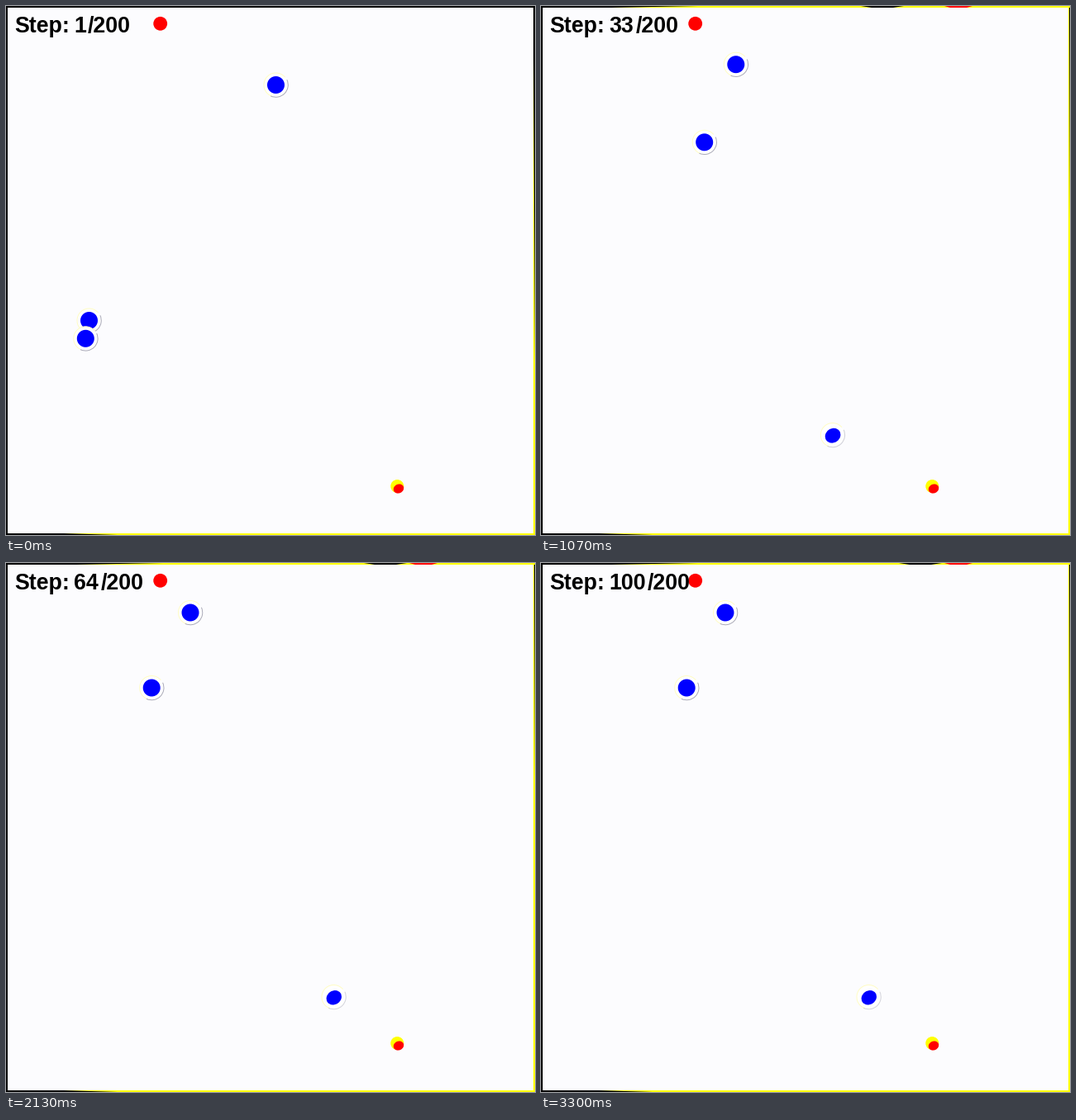
Recreate the animation shown at these times as a matplotlib script. Size 640 by 640 pixels, loop 3330 ms.

```python
import numpy as np
import matplotlib.pyplot as plt
from matplotlib.animation import FuncAnimation
from matplotlib.patches import Arc, Circle, Ellipse, Polygon, Rectangle

SIZE, DPI = 640, 100
STEPS, LOOP_MS = 100, 3330
BLUE, RED, YELLOW = "#0000ff", "#ff0000", "#ffff00"
KEYS = np.array([1, 21, 33, 43])

# Positions of each agent at the key steps; they rest after the last one.
PATHS = [
    [(326.5, 95.5), (198.5, 88.8), (235.8, 70.7), (223, 60)],
    [(100.5, 380.5), (159, 220.3), (197.7, 164.8), (176.2, 151)],
    [(96.3, 402.3), (256.5, 489.8), (352.8, 519), (396.5, 525)],
]
BUMP_PATH = [190, 335, 413, 459]

fig = plt.figure(figsize=(SIZE / DPI, SIZE / DPI), dpi=DPI)
ax = fig.add_axes([0, 0, 1, 1])
ax.set_xlim(0, SIZE)
ax.set_ylim(SIZE, 0)
ax.axis("off")
fig.patch.set_facecolor("#fcfcfe")


def track(values, step):
    """Monotone cubic through the key values, ending at rest."""
    values = np.asarray(values, float)
    h = np.diff(KEYS)
    slope = np.diff(values) / h
    tangent = np.zeros(len(values))
    tangent[0] = slope[0]
    for i in range(1, len(h)):
        a, b = slope[i - 1], slope[i]
        if a * b > 0:
            tangent[i] = 2 * a * b / (a + b)
    step = min(step, KEYS[-1])
    i = min(np.searchsorted(KEYS, step, side="right") - 1, len(h) - 1)
    u = (step - KEYS[i]) / h[i]
    return ((1 + 2 * u) * (1 - u) ** 2 * values[i]
            + u * (1 - u) ** 2 * h[i] * tangent[i]
            + u * u * (3 - 2 * u) * values[i + 1]
            + u * u * (u - 1) * h[i] * tangent[i + 1])


def add(patch):
    return ax.add_patch(patch)


def rect(x, y, w, h, color):
    return add(Rectangle((x, y), w, h, color=color, lw=0))


def wedge(points, color="black"):
    return add(Polygon(points, color=color, lw=0))


class Agent:
    def __init__(self, path):
        self.xs, self.ys = zip(*path)
        self.halo = add(Circle((0, 0), 14.5, color="white", lw=0))
        self.light = add(Arc((0, 0), 29, 29, theta1=110, theta2=320,
                             color="#fffcc4", lw=0.7))
        self.shade = add(Arc((0, 0), 29.5, 29.5, theta1=-25, theta2=115,
                             color="#aaaab8", lw=0.7))
        self.body = add(Ellipse((0, 0), 21, 21, angle=-35, color=BLUE, lw=0))

    def move(self, step):
        x, y = track(self.xs, step), track(self.ys, step)
        k = np.clip((x + y - 500) / 420, 0, 1)
        for part in (self.halo, self.light, self.shade):
            part.set_center((x, y))
        self.shade.set_alpha(1 - 0.5 * k)
        self.body.set_center((x + 0.3 * k, y + 0.8 * k))
        self.body.width = 21 - 1.8 * k
        self.body.height = 21 - 4.5 * k


# Goals
add(Circle((186.7, 21.3), 8.4, color=RED, lw=0))
add(Circle((473.3, 581), 8, color=YELLOW, lw=0))
add(Ellipse((475, 584), 12.8, 10.8, angle=-25, color=RED, lw=0))

agents = [Agent(path) for path in PATHS]

# Walls
rect(0, 638, SIZE, 2, YELLOW)
wedge([(0, 638), (70, 638), (135, 640), (0, 640)])
rect(638, 0, 2, SIZE, YELLOW)
right_start = wedge([(638, 0), (640, 0), (640, 430), (638, 60)])
right_rest = wedge([(639, 2), (640, 2), (640, 260)])
top_start = rect(0, 0, SIZE, 2, "black")
top_rest = [
    rect(0, 0, SIZE, 2, YELLOW),
    wedge([(0, 0), (190, 0), (85, 2), (0, 2)]),
    wedge([(488, 0), (522, 0), (515, 2), (495, 2)], RED),
]
bump = wedge([(0, 0), (1, 0), (1, 1)])
rect(0, 0, 2, SIZE, "black")

# Step counter
font = dict(family="Liberation Sans", weight="bold", size=26.8 * 72 / DPI,
            color="black", va="baseline")
ax.text(10, 32, "Step:", **font)
count = ax.text(82, 32, "", **font)
total = ax.text(151, 32, "/200", ha="right", **font)


def update(frame):
    step = frame + 1
    for agent in agents:
        agent.move(step)

    first = step == 1
    top_start.set_visible(first)
    right_start.set_visible(first)
    for part in top_rest + [right_rest, bump]:
        part.set_visible(not first)
    x = track(BUMP_PATH, step)
    bump.set_xy([(x - 26, 0), (x + 26, 0), (x + 13, 2), (x - 13, 2)])

    digits = str(step)
    count.set_text(digits)
    kern = 2 if digits[-1] in "1279" else 0
    total.set_x(152.6 + 13.9 * (len(digits) - 1) - kern)
    return []


anim = FuncAnimation(fig, update, frames=STEPS, interval=LOOP_MS / STEPS,
                     init_func=lambda: update(0), repeat=True, repeat_delay=0)
plt.show()
```
